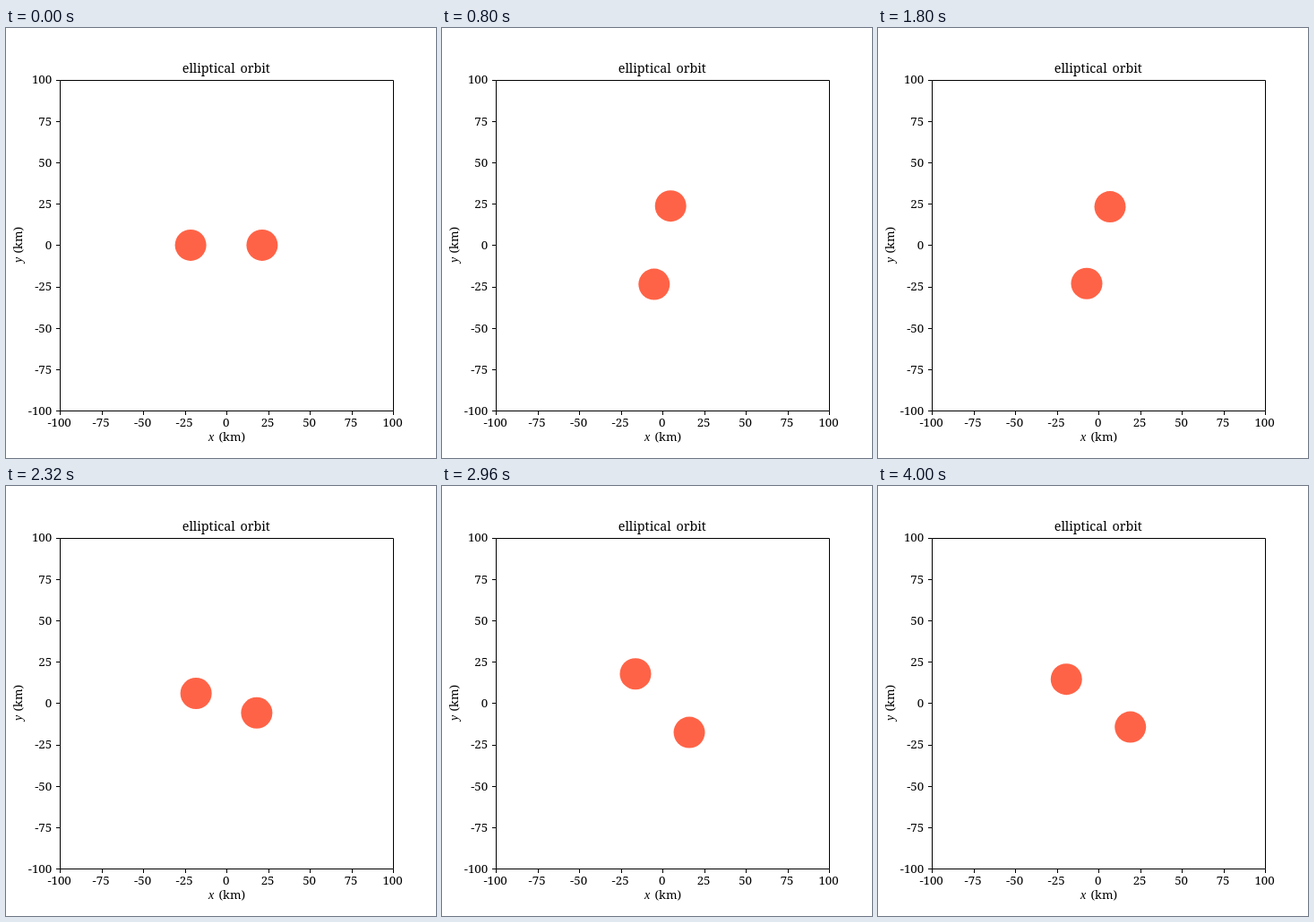
These frames come from a looping animation (480 by 480 pixels, 4.04 s). An HTML page:

```html
<!DOCTYPE html>
<html lang="en">
<head>
<meta charset="utf-8">
<title>elliptical orbit</title>
<style>
  html, body { margin: 0; width: 100%; height: 100%; overflow: hidden; background: #fff; }
  svg { display: block; width: 100vw; height: 100vh; }
  text { font: 13.3px "Noto Serif", serif; fill: #000; }
  .title { font-size: 14.3px; word-spacing: 2px; }
  .math { font: italic 14px "Liberation Serif", serif; }
  .axes { fill: none; stroke: #000; stroke-width: 1; }
  .body { fill: #ff6347; }
</style>
</head>
<body>
<svg viewBox="0 0 480 480">
  <circle class="body" id="left" r="17.5"/>
  <circle class="body" id="right" r="17.5"/>
  <path class="axes" d="M60.5 58.5H432.5V427.5H60.5Z"/>
  <g id="ticks"></g>
  <text class="title" x="245.8" y="50" text-anchor="middle">elliptical orbit</text>
  <g transform="translate(226 461)">
    <text class="math">x</text><text x="11.5">(km)</text>
  </g>
  <g transform="translate(18 262) rotate(-90)">
    <text class="math">y</text><text x="10.5">(km)</text>
  </g>
</svg>
<script>
const STEP = 40, STEPS = 101;
const RAD = Math.PI / 180;
const toX = km => 246 + km * 1.86;
const toY = km => 242.4 - km * 1.848;
const snap = v => Math.floor(v + 0.5) + 0.5;

function add(parent, tag, attrs, text = '') {
  const node = document.createElementNS('http://www.w3.org/2000/svg', tag);
  for (const key in attrs) node.setAttribute(key, attrs[key]);
  node.textContent = text;
  parent.append(node);
}

function drawTicks() {
  const ticks = document.getElementById('ticks');
  for (let km = -100; km <= 100; km += 25) {
    const x = toX(km), y = toY(km);
    add(ticks, 'path', { class: 'axes', d: `M${snap(x)} 427.5v4.5M60.5 ${snap(y)}h-4.5` });
    add(ticks, 'text', { x: x - 0.4, y: 445, 'text-anchor': 'middle' }, km);
    add(ticks, 'text', { x: 51.2, y: y + 4.8, 'text-anchor': 'end' }, km);
  }
}

// Precessing orbit: the radial phase runs slower than the angle.
function orbit(n) {
  const phase = (13.63 * n - 78.7) * RAD;
  const r = 21.81 - 2.555 * Math.cos(phase) - 0.15 * Math.cos(2 * phase);
  const angle = (21.107 * n + 21.32 + 21.9 * Math.sin(phase)
    + 0.58 * Math.sin(2 * phase) + 0.42 * Math.sin(3 * phase)) * RAD;
  return [r * Math.cos(angle), r * Math.sin(angle)];
}

function place(id, x, y) {
  const body = document.getElementById(id);
  body.setAttribute('cx', toX(x));
  body.setAttribute('cy', toY(y));
}

function render(ms) {
  const [x, y] = orbit(Math.floor(ms / STEP) % STEPS);
  place('right', x, y);
  place('left', -x, -y);
}

drawTicks();
render(0);
const start = performance.now();
function tick() {
  render(performance.now() - start);
  requestAnimationFrame(tick);
}
requestAnimationFrame(tick);
</script>
</body>
</html>
```
